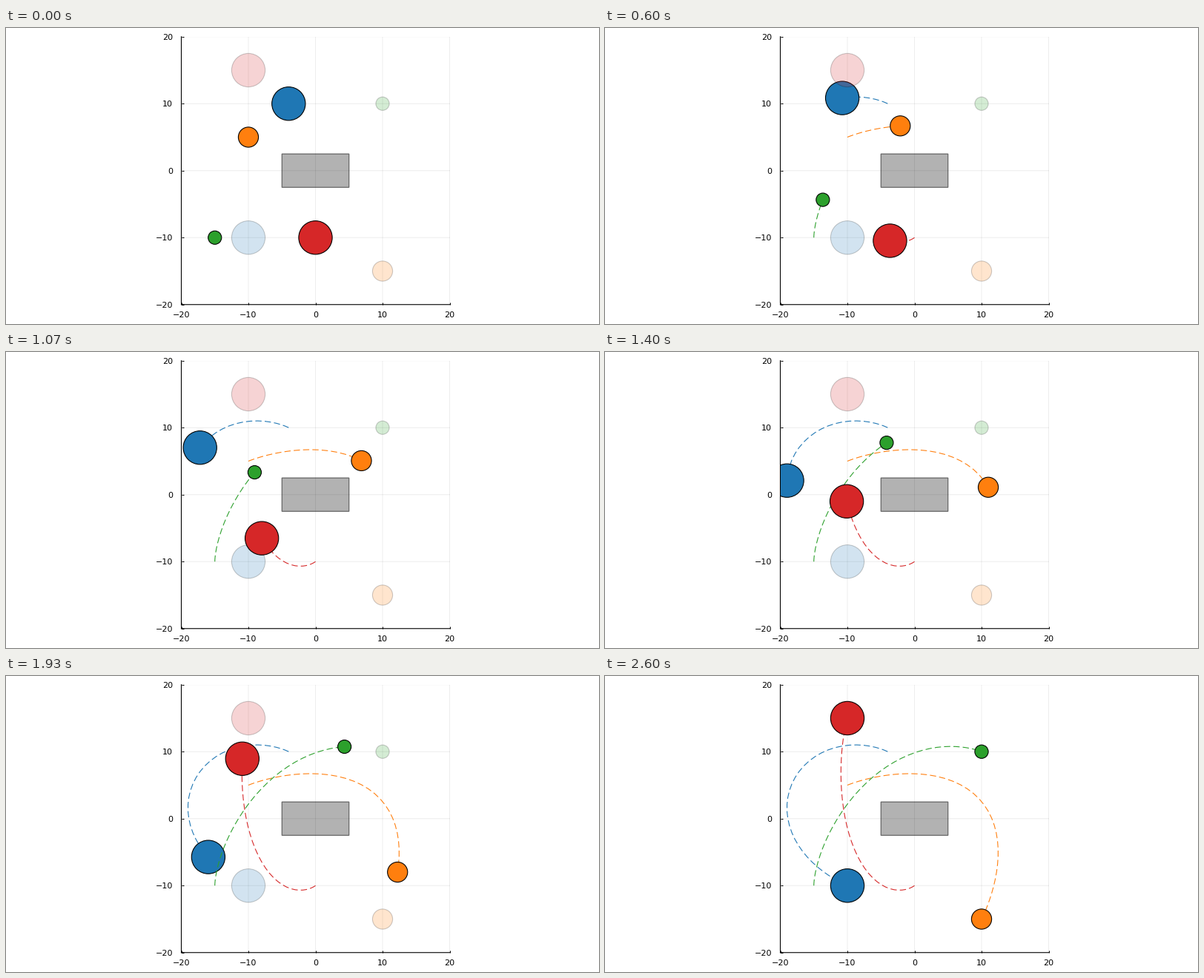
A matplotlib script that plays this animation: 800 px wide and 400 px high, repeating every 2670 ms.

```python
import numpy as np
import matplotlib.pyplot as plt
from matplotlib.animation import FuncAnimation
from matplotlib.patches import Circle, Rectangle

DPI = 100
PX = 72 / DPI            # one pixel in points
STEPS = 39               # moves from start to goal
TICK_MS, LOOP_MS = 10, 2670
VIA = np.array([12, 21, 33]) / STEPS   # progress at the via points

# colour, radius, start, via points, goal
AGENTS = [
    ("tab:blue", 2.5, (-4, 10), [(-13.9, 9.8), (-19, 2.1), (-12.9, -8.4)], (-10, -10)),
    ("tab:orange", 1.5, (-10, 5), [(1.95, 6.55), (11, 1.1), (11.2, -12.1)], (10, -15)),
    ("tab:green", 1.0, (-15, -10), [(-12.1, -1.05), (-4.15, 7.75), (7.7, 10.6)], (10, 10)),
    ("tab:red", 2.5, (0, -10), [(-5.6, -9.4), (-10.1, -1), (-10.5, 12.7)], (-10, 15)),
]


def ease(s):
    return s * s * (3 - 2 * s)


def bump(s):
    return (s * (1 - s)) ** 2


def trajectory(start, via, goal):
    """Eased move from rest to rest, bent smoothly through the via points."""
    start, via, goal = map(np.array, (start, via, goal))

    def straight(s):
        return start + np.outer(ease(s), goal - start)

    bend = np.polyfit(VIA, (via - straight(VIA)) / bump(VIA)[:, None], 2)
    s = np.linspace(0, 1, STEPS + 1)
    return straight(s) + bump(s)[:, None] * (np.vander(s, 3) @ bend)


def make_axes(fig):
    ax = fig.add_axes([236.5 / 800, 26.25 / 400, 362 / 800, 362 / 400])
    ticks = range(-20, 21, 10)
    ax.set(xlim=(-20, 20), ylim=(-20, 20), xticks=ticks, yticks=ticks)
    ax.set_axisbelow(True)
    ax.grid(color="black", alpha=0.07, lw=PX)
    ax.tick_params(direction="in", length=3 * PX, width=PX, labelsize=8)
    ax.tick_params(axis="x", pad=9 * PX)
    ax.tick_params(axis="y", pad=11.5 * PX)
    ax.spines[["top", "right"]].set_visible(False)
    ax.spines[["left", "bottom"]].set(linewidth=1.1 * PX, zorder=0.9, snap=False)
    for line in ax.get_xgridlines() + ax.get_ygridlines():
        line.set_snap(False)
    return ax


def add_disc(ax, centre, radius, color, alpha, z):
    disc = Circle(centre, radius, fc=(color, alpha), ec=("black", alpha),
                  lw=1.1 * PX, zorder=z)
    return ax.add_patch(disc)


plt.rcParams["font.family"] = "DejaVu Sans"
plt.rcParams["lines.scale_dashes"] = False

fig = plt.figure(figsize=(8, 4), dpi=DPI, facecolor="white")
ax = make_axes(fig)
ax.add_patch(Rectangle((-5, -2.5), 10, 5, fc=("black", 0.3), ec=("black", 0.5),
                       lw=1.3 * PX, zorder=2, snap=False))

movers = []
for z, (color, radius, start, via, goal) in enumerate(AGENTS, 3):
    trail, = ax.plot([], [], color=color, lw=1.1 * PX, zorder=z,
                     dashes=(8.4 * PX, 4.2 * PX), dash_capstyle="butt")
    body = add_disc(ax, start, radius, color, 1, z + 0.2)
    add_disc(ax, goal, radius, color, 0.2, z + 0.4)
    movers.append((trajectory(start, via, goal), trail, body))


def update(tick):
    # 15 steps a second, with step times rounded to the 10 ms tick
    step = 3 * (2 * tick + 1) // 40
    for path, trail, body in movers:
        trail.set_data(*path[:step + 1].T)
        body.center = path[step]
    return [artist for mover in movers for artist in mover[1:]]


anim = FuncAnimation(fig, update, frames=LOOP_MS // TICK_MS,
                     interval=TICK_MS, repeat=True, repeat_delay=0)
plt.show()
```
